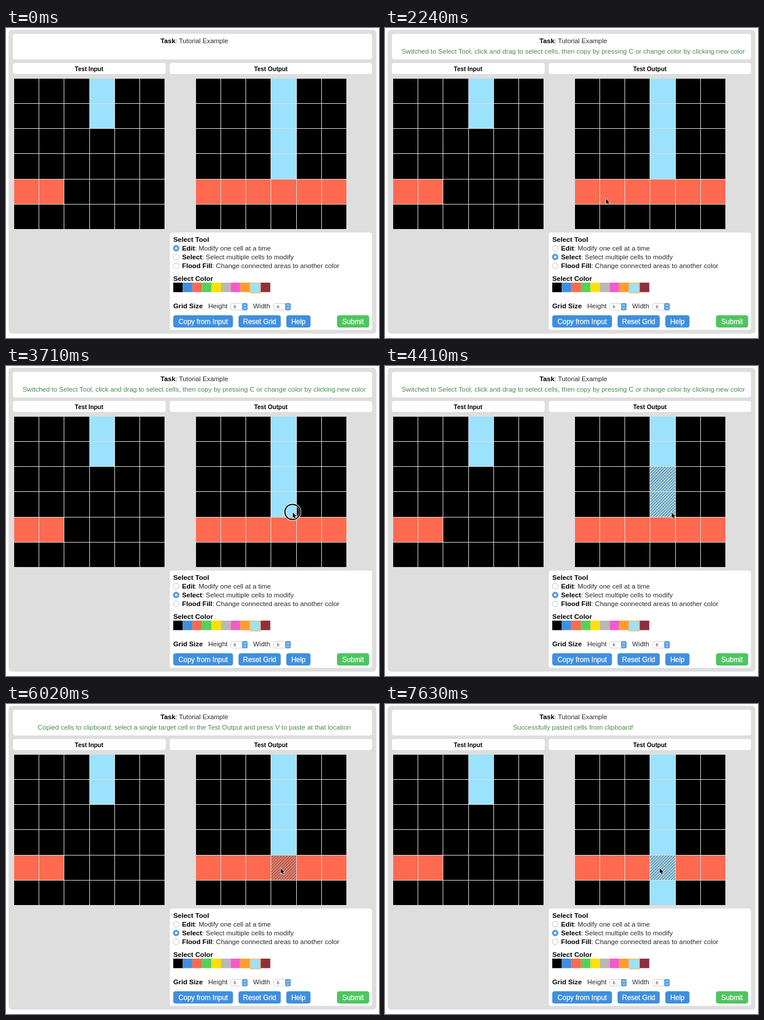
Write an HTML page that moves like this. It is 640 by 532 pixels and loops after 7.7 s.

```html
<!DOCTYPE html>
<html lang="en">
<head>
<meta charset="utf-8">
<title>Grid editor demo</title>
<style>
  html, body { margin: 0; width: 100%; height: 100%; overflow: hidden; background: #fff; }
  svg { display: block; width: 100vw; height: 100vh; }
  text { font: 11.5px "Liberation Sans", Arial, sans-serif; fill: #2a2a2a; white-space: pre; }
  .bold { font-size: 11.7px; font-weight: bold; fill: #000; }
  .title { font-size: 10.4px; font-weight: bold; fill: #000; text-anchor: middle; }
  .button { font-size: 11.9px; fill: #fff; stroke: #fff; stroke-width: .25; text-anchor: middle; }
  .small { font-size: 8px; fill: #333; }
  #message { fill: #4a8a4c; text-anchor: middle; }
</style>
</head>
<body>
<svg id="stage" viewBox="0 0 640 532">
  <defs>
    <pattern id="hatch" width="3.5" height="3.5" patternUnits="userSpaceOnUse" patternTransform="rotate(45)">
      <rect width="3.5" height="3.5" fill="#bbb" fill-opacity=".25"/>
      <rect width="1" height="3.5" fill="#27333b" fill-opacity=".65"/>
    </pattern>
  </defs>
  <rect x="4.5" y="3" width="631" height="521.5" rx="6" fill="#dedede"/>
  <g fill="#fff">
    <rect x="12" y="10" width="616" height="44" rx="4"/>
    <rect x="12" y="60" width="262" height="19" rx="4"/>
    <rect x="281" y="60" width="347" height="19" rx="4"/>
    <rect x="281" y="351" width="347" height="167" rx="4"/>
  </g>
  <text x="265" y="26" style="font-size:11.3px"><tspan class="bold">Task</tspan>: Tutorial Example</text>
  <text id="message" x="323" y="44"></text>
  <text class="title" x="142.5" y="74">Test Input</text>
  <text class="title" x="454.5" y="74">Test Output</text>
  <g id="grids"></g>

  <text class="bold" x="287" y="367">Select Tool</text>
  <text x="302" y="382"><tspan class="bold">Edit</tspan>: Modify one cell at a time</text>
  <text x="302" y="397"><tspan class="bold">Select</tspan>: Select multiple cells to modify</text>
  <text x="302" y="412"><tspan class="bold">Flood Fill</tspan>: Change connected areas to another color</text>
  <g id="radios"></g>
  <text class="bold" x="287" y="434">Select Color</text>
  <g id="swatches"></g>
  <text class="bold" x="287" y="481">Grid Size</text>
  <text x="347" y="481">Height</text>
  <text x="424" y="481">Width</text>
  <g id="controls"></g>

  <g id="ring" fill="none">
    <circle r="13.2" stroke="#fff" stroke-opacity=".85" stroke-width="4"/>
    <circle r="13" stroke="#000" stroke-width="2"/>
  </g>
  <g id="cursor">
    <path d="M.5 1V9.8L2.6 8L4.1 11.4L5.6 10.7L4.1 7.5H6.9Z" fill="#000" stroke="#fff" stroke-width="1.3" paint-order="stroke"/>
  </g>
</svg>
<script>
const LOOP = 7700, STEP = 70, SIZE = 6, CELL = 43.2, TOP = 86.3;
const BLACK = '#000', RED = '#ff6a50', SKY = '#9be2ff', BLUE = '#3f8fe0', GREEN = '#4cc65f';
const PALETTE = [BLACK, BLUE, RED, '#57cf5a', '#ffe000', '#b8b8b8', '#f25cc8', '#ff9d2e', SKY, '#8e303e'];
const PICKED = PALETTE.indexOf(SKY);

const byId = id => document.getElementById(id);

function add(parent, tag, attrs, content = '') {
  const node = document.createElementNS('http://www.w3.org/2000/svg', tag);
  for (const key in attrs) node.setAttribute(key, attrs[key]);
  node.textContent = content;
  return parent.appendChild(node);
}

// Position of a grid line, snapped to the middle of a pixel.
const gridLine = (origin, i) => Math.floor(origin + i * CELL + 1e-6) + .5;

// Returns the cell rectangles, indexed by row * SIZE + column.
function makeGrid(left, colorAt) {
  const cells = [];
  for (let i = 0; i < SIZE * SIZE; i++) {
    const row = Math.floor(i / SIZE), col = i % SIZE;
    const x = gridLine(left, col), y = gridLine(TOP, row);
    cells.push(add(byId('grids'), 'rect', {
      x, y,
      width: gridLine(left, col + 1) - x,
      height: gridLine(TOP, row + 1) - y,
      fill: colorAt(row, col), stroke: '#dedede'
    }));
  }
  return cells;
}

makeGrid(13.5, (row, col) => row < 2 && col === 3 ? SKY : row === 4 && col < 2 ? RED : BLACK);
const output = makeGrid(325.2, (row, col) => row === 4 ? RED : row < 4 && col === 3 ? SKY : BLACK);
const column = row => output[row * SIZE + 3];
const hatches = [2, 3, 4].map(row => {
  const hatch = column(row).cloneNode();
  hatch.setAttribute('fill', 'url(#hatch)');
  return byId('grids').appendChild(hatch);
});

const radios = [378, 393, 408].map(cy => ({
  outer: add(byId('radios'), 'circle', { cx: 292, cy, r: 5 }),
  dot: add(byId('radios'), 'circle', { cx: 292, cy, r: 2, fill: '#fff' })
}));

// The picked swatch is wider by its border and pushes its neighbour right.
PALETTE.forEach((fill, i) => add(byId('swatches'), 'rect', {
  x: 287 + i * 16.4 + (i > PICKED ? 2.5 : 0), y: 437, width: 16.4, height: 16.3, fill
}));
add(byId('swatches'), 'rect', {
  x: 288 + PICKED * 16.4, y: 437.5, width: 17, height: 17.2, fill: SKY, stroke: '#f0c070', 'stroke-width': 1.5
});

for (const x of [385.5, 459.5]) {
  const group = byId('controls');
  add(group, 'rect', { x, y: 472.5, width: 28.5, height: 11.5, rx: 2.5, fill: '#fff', stroke: '#d0d0d0' });
  add(group, 'rect', { x: x + 19.5, y: 472, width: 9.5, height: 12.5, rx: 2.5, fill: '#5a9fe8' });
  add(group, 'path', { d: `M${x + 22.3} 477l2-2.2l2 2.2m-4 2.6l2 2.2l2-2.2`, fill: 'none', stroke: '#fff' });
  add(group, 'text', { x: x + 5, y: 481.2, class: 'small' }, '6');
}

for (const [label, x, width, fill] of [
  ['Copy from Input', 287, 102.5, BLUE], ['Reset Grid', 399, 72.5, BLUE],
  ['Help', 481, 41.5, BLUE], ['Submit', 568, 55, GREEN]
]) {
  add(byId('controls'), 'rect', { x, y: 493, width, height: 21, rx: 4, fill });
  add(byId('controls'), 'text', { x: x + width / 2, y: 507.8, class: 'button' }, label);
}

const SWITCHED = 1610, SELECTED = 3850, COPIED = 4480, RETARGETED = 5670, PASTED = 6580;
const presses = [[1470, SWITCHED], [2870, SELECTED], [5530, RETARGETED]];
const messages = [
  [PASTED, 'Successfully pasted cells from clipboard!'],
  [COPIED, 'Copied cells to clipboard, select a single target cell in the Test Output and press V to paste at that location'],
  [SWITCHED, 'Switched to Select Tool, click and drag to select cells, then copy by pressing C or change color by clicking new color'],
  [0, '']
];
// Cursor stops: time, x, y
const stops = [
  [420, 330, 545], [1190, 292.5, 393], [1820, 292.5, 393], [2660, 464.5, 191], [3080, 464.5, 191],
  [3710, 491.5, 250.5], [4850, 491.5, 250.5], [5350, 471, 281], [LOOP, 471, 281]
];

function cursorAt(t) {
  if (t <= stops[0][0]) return stops[0].slice(1);
  const next = stops.findIndex(stop => stop[0] > t);
  const [t0, x0, y0] = stops[next - 1], [t1, x1, y1] = stops[next];
  const u = (t - t0) / (t1 - t0), eased = u * u * (3 - 2 * u);
  return [x0 + (x1 - x0) * eased, y0 + (y1 - y0) * eased];
}

const show = (node, visible) => node.setAttribute('visibility', visible ? 'visible' : 'hidden');

function draw(t) {
  byId('message').textContent = messages.find(([start]) => t >= start)[1];

  const tool = t < SWITCHED ? 0 : 1;
  radios.forEach(({ outer, dot }, i) => {
    outer.setAttribute('fill', i === tool ? '#5a9de8' : '#fff');
    outer.setAttribute('stroke', i === tool ? '#4c8fdc' : '#c4c4c4');
    show(dot, i === tool);
  });

  const pasted = t >= PASTED;
  column(4).setAttribute('fill', pasted ? SKY : RED);
  column(5).setAttribute('fill', pasted ? SKY : BLACK);
  const pairSelected = t >= SELECTED && t < RETARGETED;
  hatches.forEach((hatch, i) => show(hatch, i < 2 ? pairSelected : t >= RETARGETED));

  const place = `translate(${cursorAt(t).join(' ')})`;
  byId('cursor').setAttribute('transform', place);
  byId('ring').setAttribute('transform', place);
  show(byId('ring'), presses.some(([down, up]) => t >= down && t < up));
}

const start = performance.now();
function tick() {
  const t = (performance.now() - start) % LOOP;
  draw(Math.floor(t / STEP) * STEP);
  requestAnimationFrame(tick);
}
tick();
</script>
</body>
</html>
```
